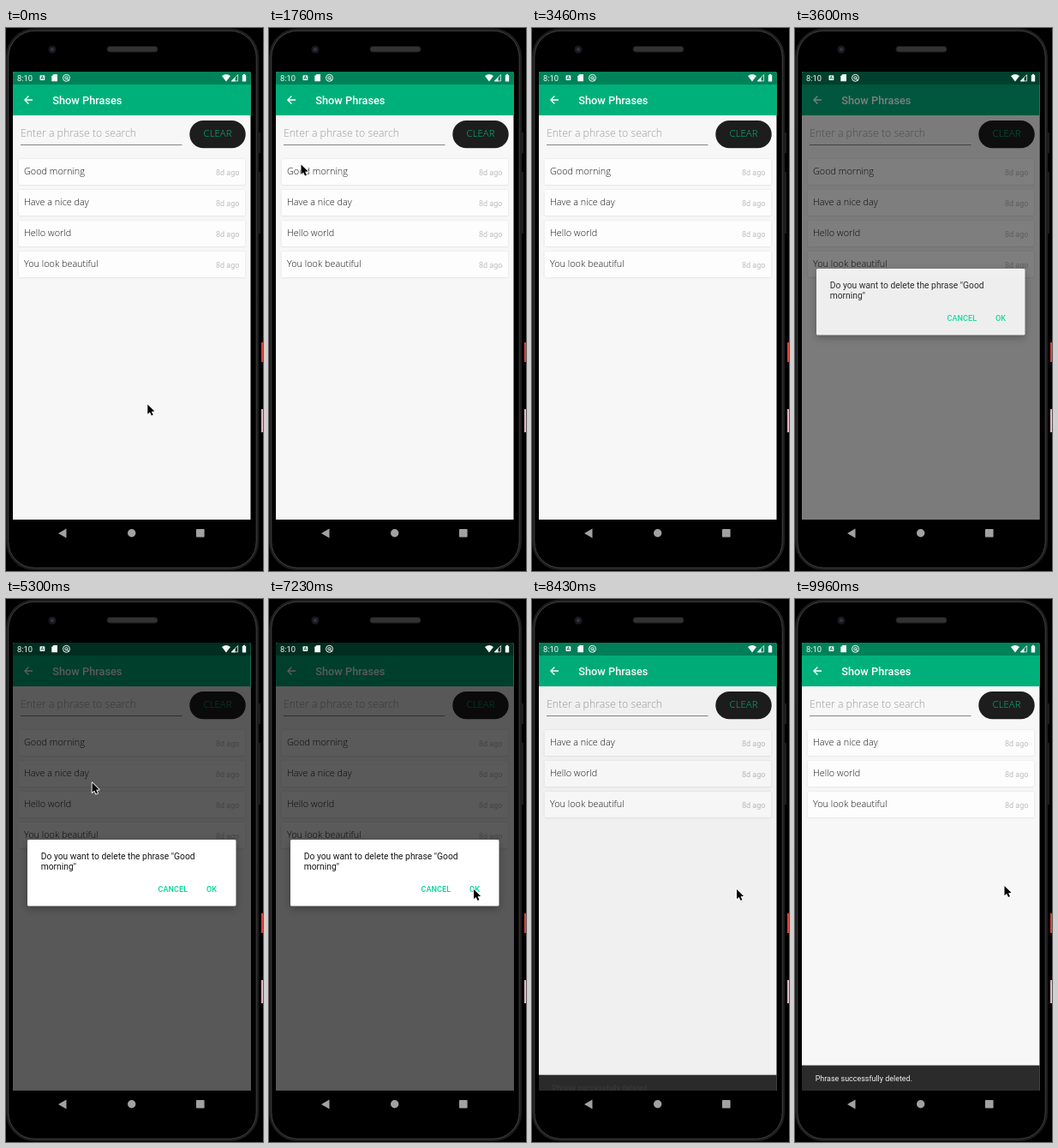
Write an HTML page with a canvas that moves like this. It is 300 px wide and 634 px high and loops after 10000 ms.

```html
<!DOCTYPE html>
<html lang="en">
<head>
<meta charset="utf-8">
<title>Show Phrases</title>
<style>
  html, body { margin: 0; width: 100%; height: 100%; overflow: hidden; background: #000; }
  canvas { display: block; width: 300px; height: 634px; }
</style>
</head>
<body>
<canvas id="stage"></canvas>
<script>
const W = 300, H = 634, LOOP = 10000;
const canvas = document.getElementById('stage');
const ctx = canvas.getContext('2d');
const ratio = window.devicePixelRatio || 1;
canvas.width = W * ratio;
canvas.height = H * ratio;

const ROBOTO = 'Roboto, sans-serif';
const OPEN = '"Open Sans", sans-serif';
const SCREEN = { x: 8, y: 51, w: 277.7, h: 523 };
const SCREEN_BOTTOM = SCREEN.y + SCREEN.h;
const DIALOG_IN = 3500, DIALOG_OUT = 8230, SNACK_IN = 8330;
const PHRASES = ['Good morning', 'Have a nice day', 'Hello world', 'You look beautiful'];

const clamp = v => Math.min(1, Math.max(0, v));
const progress = (t, start, length) => clamp((t - start) / length);
const smooth = u => u * u * (3 - 2 * u);
const mix = (a, b, u) => a + (b - a) * u;

// Cubic bezier (0.4, 0, 0.2, 1), solved by bisection.
function fastOutSlowIn(x) {
  let lo = 0, hi = 1, s = 0.5;
  for (let i = 0; i < 18; i++) {
    s = (lo + hi) / 2;
    const bx = 1.2 * s * (1 - s) ** 2 + 0.6 * s * s * (1 - s) + s ** 3;
    if (bx < x) lo = s; else hi = s;
  }
  return 3 * s * s * (1 - s) + s ** 3;
}

function rect(x, y, w, h, color) {
  ctx.fillStyle = color;
  ctx.fillRect(x, y, w, h);
}

function rounded(x, y, w, h, r, fill, stroke, line = 1) {
  ctx.beginPath();
  ctx.roundRect(x, y, w, h, r);
  if (fill) { ctx.fillStyle = fill; ctx.fill(); }
  if (stroke) { ctx.strokeStyle = stroke; ctx.lineWidth = line; ctx.stroke(); }
}

function disc(x, y, r, color) {
  ctx.beginPath();
  ctx.arc(x, y, r, 0, Math.PI * 2);
  ctx.fillStyle = color;
  ctx.fill();
}

function shape(points, color) {
  ctx.beginPath();
  points.forEach(([x, y]) => ctx.lineTo(x, y));
  ctx.closePath();
  ctx.fillStyle = color;
  ctx.fill();
}

function text(str, x, y, size, family, color, weight = 400, align = 'left') {
  ctx.font = `${weight} ${size}px ${family}`;
  ctx.textAlign = align;
  ctx.fillStyle = color;
  ctx.fillText(str, x, y);
}

function withShadow(color, blur, dy, draw) {
  ctx.save();
  ctx.shadowColor = color;
  ctx.shadowBlur = blur * ratio;
  ctx.shadowOffsetY = dy * ratio;
  draw();
  ctx.restore();
}

function drawPhone() {
  rect(0, 0, W, H, '#000');
  rect(294, 122, 3, 24, '#1d1d1d');
  rect(294, 168, 3, 72, '#1d1d1d');
  rounded(1.5, 2, 292, 629.5, 32, '#000', '#1e1e1e', 3);
  rounded(2.8, 3.3, 289.4, 627, 30.5, null, '#3e3e3e', 1);
  rounded(118, 21.5, 59, 6.5, 3, '#323232', '#1c1c1c', 1);
  disc(54, 25, 4.5, '#191a20');
  disc(54, 25, 2, '#34353f');
  rect(298, 367, 2, 23, '#d8433a');
  rect(298, 445, 2, 27, '#dfb4c4');

  const nav = '#a2a2a2';
  shape([[61, 590], [70.5, 584.5], [70.5, 595.5]], nav);
  disc(146.7, 589.8, 4.7, nav);
  rounded(222, 585, 9.6, 9.6, 0.8, nav);
}

function drawStatus() {
  const white = '#f4fbf8';
  text('8:10', 13, 62, 9.3, ROBOTO, white);
  rounded(39.5, 55.3, 5.8, 5.8, 0.8, white);
  text('A', 42.4, 60.2, 5.5, ROBOTO, '#05694a', 700, 'center');
  shape([[55.5, 54], [60, 54], [60, 62.2], [53.3, 62.2], [53.3, 56.3]], white);
  ctx.strokeStyle = white;
  ctx.lineWidth = 1;
  ctx.beginPath();
  ctx.arc(70.5, 58.3, 4, 0, Math.PI * 2);
  ctx.moveTo(72.2, 58.3);
  ctx.arc(70.5, 58.3, 1.7, 0, Math.PI * 2);
  ctx.moveTo(70.5, 58.3);
  ctx.lineTo(73.3, 61.1);
  ctx.stroke();

  ctx.beginPath();
  ctx.moveTo(257, 62.5);
  ctx.lineTo(252, 56);
  ctx.quadraticCurveTo(257, 52.2, 262, 56);
  ctx.closePath();
  ctx.fillStyle = white;
  ctx.fill();
  shape([[267.5, 57.5], [267.5, 62.3], [262.8, 62.3]], white);
  ctx.lineWidth = 0.8;
  ctx.beginPath();
  ctx.moveTo(270.6, 54.6);
  ctx.lineTo(270.6, 61.9);
  ctx.lineTo(263.3, 61.9);
  ctx.closePath();
  ctx.stroke();
  rounded(275.8, 54.8, 4.4, 7.7, 0.6, white);
  rect(277, 53.8, 2, 1.2, white);
}

function drawCard(phrase, index) {
  const y = 153 + index * 36;
  withShadow('rgba(0,0,0,0.15)', 2, 0.2, () => rounded(14.5, y, 264.7, 30, 1.2, '#fdfdfd'));
  text(phrase, 21, y + 18, 10.85, OPEN, '#181818', 300);
  text('8d ago', 245, y + 18.5, 9, ROBOTO, '#bcbcbc');
}

function drawApp(t) {
  rect(SCREEN.x, SCREEN.y, SCREEN.w, SCREEN.h, '#f7f7f7');
  rect(8, 66, 278, 36, '#00b07a');
  rect(8, 51, 278, 15, '#008259');

  ctx.strokeStyle = '#fff';
  ctx.lineWidth = 1.3;
  ctx.beginPath();
  ctx.moveTo(31, 84);
  ctx.lineTo(22.2, 84);
  ctx.moveTo(26.4, 79.5);
  ctx.lineTo(21.9, 84);
  ctx.lineTo(26.4, 88.5);
  ctx.stroke();
  text('Show Phrases', 54.3, 88.5, 12.75, ROBOTO, '#fff', 500);

  text('Enter a phrase to search', 17, 127, 12.3, OPEN, '#9c9c9c', 300);
  rect(17, 136, 188.5, 1, '#858585');
  rounded(214.3, 108, 65.4, 32.3, 16.1, '#1d1d1d');
  text('CLEAR', 247, 127.2, 11.4, OPEN, '#00bd84', 300, 'center');

  PHRASES.slice(t < DIALOG_OUT ? 0 : 1).forEach(drawCard);
}

function drawSnackbar(t) {
  if (t < SNACK_IN) return;
  const y = SCREEN_BOTTOM - 29.5 * fastOutSlowIn(progress(t, SNACK_IN, 250));
  rect(8, y, 278, 31, '#2b2b2b');
  ctx.save();
  ctx.globalAlpha = fastOutSlowIn(progress(t, SNACK_IN + 70, 180));
  text('Phrase successfully deleted.', 23.7, y + 18.6, 8.95, ROBOTO, '#f2f2f2');
  ctx.restore();
}

function drawDialog(t) {
  const enter = progress(t, DIALOG_IN, 190);
  const dim = 0.645 * (1 - (1 - enter) ** 2) * (1 - progress(t, DIALOG_OUT, 210));
  if (dim > 0) rect(SCREEN.x, SCREEN.y, SCREEN.w, SCREEN.h, `rgba(0,0,0,${dim})`);
  drawStatus();

  const alpha = (1 - (1 - enter) ** 3) * (1 - progress(t, DIALOG_OUT, 150));
  if (alpha <= 0) return;
  ctx.save();
  ctx.globalAlpha = alpha;
  withShadow('rgba(0,0,0,0.3)', 9, 3, () => rounded(25, 281, 243.5, 77.5, 1.5, '#fff'));
  text('Do you want to delete the phrase "Good', 40.7, 304, 10.3, ROBOTO, '#151515');
  text('morning"', 40.7, 316.2, 10.3, ROBOTO, '#151515');
  text('CANCEL', 177.6, 342.3, 9.1, ROBOTO, '#00d596', 500);
  text('OK', 234, 342.3, 9.1, ROBOTO, '#00d596', 500);
  ctx.restore();
}

// Each leg: start time, duration, from and to.
const LEGS = [
  [400, 1100, [165.3, 439.5], [37.5, 159.5]],
  [4900, 1300, [60, 178], [239, 339]],
  [8900, 700, [239, 339], [244.5, 335]]
];

function drawCursor(t) {
  if (t > 2900 && t < 4900) return;
  const [start, length, from, to] = LEGS.filter(leg => leg[0] <= t).pop() || LEGS[0];
  const u = smooth(progress(t, start, length));
  ctx.save();
  ctx.translate(mix(from[0], to[0], u), mix(from[1], to[1], u));
  ctx.scale(0.87, 0.87);
  ctx.beginPath();
  [[0, 0], [0, 13], [3, 10.3], [5.2, 15], [7.4, 14], [5.3, 9.5], [9.3, 9.2]]
    .forEach(([x, y]) => ctx.lineTo(x, y));
  ctx.closePath();
  ctx.lineJoin = 'round';
  ctx.lineWidth = 2;
  ctx.strokeStyle = '#fff';
  ctx.stroke();
  ctx.fillStyle = '#000';
  ctx.fill();
  ctx.restore();
}

function draw(t) {
  ctx.setTransform(ratio, 0, 0, ratio, 0, 0);
  drawPhone();
  ctx.save();
  ctx.beginPath();
  ctx.roundRect(SCREEN.x, SCREEN.y, SCREEN.w, SCREEN.h, [2, 2, 0, 0]);
  ctx.clip();
  drawApp(t);
  drawSnackbar(t);
  drawDialog(t);
  ctx.restore();
  drawCursor(t);
}

const origin = performance.now();
function tick() {
  draw((performance.now() - origin) % LOOP);
  requestAnimationFrame(tick);
}
tick();
</script>
</body>
</html>
```
